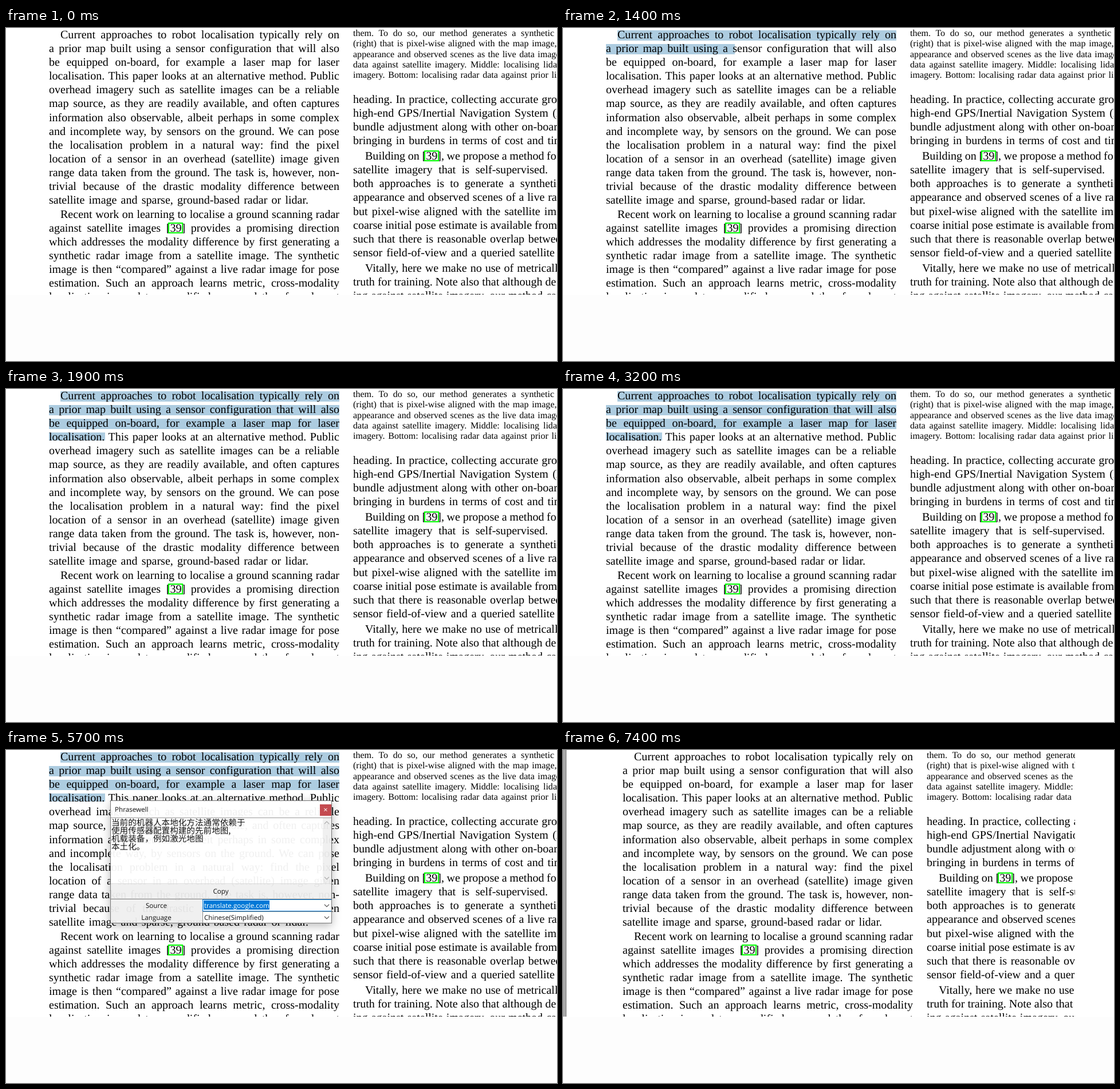
Recreate the animation shown at these times as an HTML page with a canvas. Size 962 by 582 pixels, loop 8 s.

```html
<!DOCTYPE html>
<html lang="en">
<head>
<meta charset="utf-8">
<style>
html, body { margin: 0; width: 100%; height: 100%; overflow: hidden; background: #fff; }
canvas { display: block; }
</style>
</head>
<body>
<canvas id="stage" width="962" height="582"></canvas>
<script>
const ctx = document.getElementById('stage').getContext('2d');
const SERIF = '"Liberation Serif", serif';
const UI = '11.65px "Open Sans", sans-serif';
const CJK = '14.6px "Noto Sans CJK SC", "Noto Sans CJK", sans-serif';
const LOOP = 8000, PITCH = 24.15, PAGE_BOTTOM = 466;

const left = `Current approaches to robot localisation typically rely on
a prior map built using a sensor configuration that will also
be equipped on-board, for example a laser map for laser
localisation. This paper looks at an alternative method. Public
overhead imagery such as satellite images can be a reliable
map source, as they are readily available, and often captures
information also observable, albeit perhaps in some complex
and incomplete way, by sensors on the ground. We can pose
the localisation problem in a natural way: find the pixel
location of a sensor in an overhead (satellite) image given
range data taken from the ground. The task is, however, non-
trivial because of the drastic modality difference between
satellite image and sparse, ground-based radar or lidar.
Recent work on learning to localise a ground scanning radar
against satellite images [39] provides a promising direction
which addresses the modality difference by first generating a
synthetic radar image from a satellite image. The synthetic
image is then “compared” against a live radar image for pose
estimation. Such an approach learns metric, cross-modality
localisation is used to a modified map and therefore do not`.split('\n');

// Blocks of the right column: font size, first baseline, pitch, indent, [text, right end]
const right = [
  [16.04, 14.2, 18.15, 0, [
    ['them. To do so, our method generates a synthetic', 957],
    ['(right) that is pixel-wise aligned with the map image,', 961.5],
    ['appearance and observed scenes as the live data image', 967.5],
    ['data against satellite imagery. Middle: localising lida', 962],
    ['imagery. Bottom: localising radar data against prior li', 961.5]]],
  [20.05, 130.6, PITCH, 0, [
    ['heading. In practice, collecting accurate gro', 962],
    ['high-end GPS/Inertial Navigation System (I', 967.5],
    ['bundle adjustment along with other on-boar', 962.8],
    ['bringing in burdens in terms of cost and tim', 972.3]]],
  [20.05, 229.9, PITCH, 21, [
    ['Building on [39], we propose a method fo', 960.8],
    ['satellite imagery that is self-supervised.', 946],
    ['both approaches is to generate a synthetic', 970],
    ['appearance and observed scenes of a live ra', 961.7],
    ['but pixel-wise aligned with the satellite im', 961],
    ['coarse initial pose estimate is available from', 962],
    ['such that there is reasonable overlap betwee', 968.5],
    ['sensor field-of-view and a queried satellite', 958]]],
  [20.05, 425.9, PITCH, 21, [
    ['Vitally, here we make no use of metricall', 963.5],
    ['truth for training. Note also that although de', 960.5],
    ['ing against satellite imagery, our method ca', 961]]]
];

// Selection: start time, last selected line, its right end
const selection = [[1300, 0, 141], [1400, 1, 300], [1700, 2, 160], [1800, 3, 130], [1900, 3, 173]];
const caretToggles = [4900, 5100, 5700, 6000, 6500, 6800];

function box(x, y, w, h, fill) {
  ctx.fillStyle = fill;
  ctx.fillRect(x, y, w, h);
}

function frame(x, y, w, h, color) {
  ctx.strokeStyle = color;
  ctx.lineWidth = 1;
  ctx.strokeRect(x + .5, y + .5, w - 1, h - 1);
}

function label(str, x, y, color = '#111', align = 'left', font = UI) {
  ctx.font = font;
  ctx.textAlign = align;
  ctx.fillStyle = color;
  ctx.fillText(str, x, y);
}

function chevron(x, y, dir, color) {
  ctx.strokeStyle = color;
  ctx.lineWidth = 1.1;
  ctx.beginPath();
  ctx.moveTo(x - 4, y - 2 * dir);
  ctx.lineTo(x, y + 2 * dir);
  ctx.lineTo(x + 4, y - 2 * dir);
  ctx.stroke();
}

function justified(str, x, y, end, size) {
  ctx.font = `${size}px ${SERIF}`;
  ctx.textAlign = 'left';
  ctx.fillStyle = '#000';
  ctx.wordSpacing = '0px';
  const gaps = str.split(' ').length - 1;
  ctx.wordSpacing = (end - x - ctx.measureText(str).width) / gaps + 'px';
  ctx.fillText(str, x, y);
  const cite = str.indexOf('39');
  if (cite > 0) {
    const cx = x + ctx.measureText(str.slice(0, cite)).width;
    ctx.strokeStyle = '#0f0';
    ctx.lineWidth = 2;
    ctx.strokeRect(Math.round(cx - 2), Math.round(y - 15), 24, 17);
  }
  ctx.wordSpacing = '0px';
}

const indented = i => i === 0 || i === 13;
const leftEdge = i => indented(i) ? 95 : 75;

function drawSelection(t) {
  const step = selection.filter(s => t >= s[0]).pop();
  if (!step) return;
  const [, last, end] = step;
  for (let i = 0; i <= last; i++) {
    const x = leftEdge(i);
    box(x, 4 + 24 * i, (i < last ? 582 : end) - x, i === 3 ? 14 : 18, '#adcce0');
  }
}

function drawPage(t) {
  const scrolled = t >= 7400;
  ctx.save();
  ctx.beginPath();
  ctx.rect(0, 0, scrolled ? 894 : 962, PAGE_BOTTOM);
  ctx.clip();
  if (scrolled) {
    box(0, 0, 5, PAGE_BOTTOM, '#a9a9a9');
    box(5, 0, 1, PAGE_BOTTOM, '#777');
    ctx.translate(29, 0);
  } else drawSelection(t);
  left.forEach((str, i) =>
    justified(str, leftEdge(i), 17.6 + PITCH * i, i === 12 ? 528 : 582, 20.05));
  for (const [size, top, pitch, indent, rows] of right)
    rows.forEach(([str, end], i) =>
      justified(str, 606 + (i ? 0 : indent), top + pitch * i, end, size));
  ctx.restore();
}

function drawShadow(x, y, w, h) {
  ctx.save();
  ctx.beginPath();
  ctx.rect(0, 0, 962, 582);
  ctx.rect(x, y, w, h);
  ctx.clip('evenodd');
  ctx.shadowColor = 'rgba(0,0,0,.28)';
  ctx.shadowBlur = 15;
  ctx.shadowOffsetY = 4;
  box(x, y, w, h, '#fff');
  ctx.restore();
}

function drawPopup(t) {
  const white = 'rgba(255,255,255,.94)', grey = 'rgba(240,240,240,.95)';
  drawShadow(182, 88, 387, 215);
  box(182, 88, 387, 30, white);
  box(182, 118, 371, 115, white);
  box(553, 118, 16, 115, grey);
  box(182, 233, 387, 70, grey);

  label('Phrasewell', 190, 107.5);
  box(548, 95, 20, 20, '#c44b50');
  label('×', 558, 109, '#fff', 'center', '13px "Open Sans", sans-serif');

  box(182, 118, 387, 1, '#999');
  ['当前的机器人本地化方法通常依赖于', '使用传感器配置构建的先前地图,', '机载装备，例如激光地图', '本土化。']
    .forEach((str, i) => label(str, 184, 132.3 + 13.8 * i, '#111', 'left', CJK));
  chevron(560, 127, -1, '#aaa');
  chevron(560, 224, 1, '#aaa');

  box(182, 233, 387, 1, '#ddd');
  label('Copy', 375, 251, '#111', 'center');
  box(182, 260, 387, 1, '#777');
  label('Source', 262.5, 276, '#111', 'center');
  label('Language', 262.5, 297, '#111', 'center');

  box(343, 261, 226, 41, '#fff');
  frame(343, 261, 226, 21, '#0078d7');
  frame(343, 282, 226, 21, '#888');
  box(345, 263, 115, 16, '#0078d7');
  label('translate.google.com', 346, 276, '#fff');
  label('Chinese(Simplified)', 346, 297);
  chevron(560, 272, 1, '#555');
  chevron(560, 293, 1, '#555');
  if (caretToggles.filter(c => t >= c).length % 2 === 0) box(460, 263, 1, 16, '#000');
  frame(182, 88, 387, 215, '#777');
}

function render(now) {
  const t = now % LOOP;
  box(0, 0, 962, 582, '#fff');
  box(0, 467, 962, 115, '#fdfdfd');
  drawPage(t);
  if (t >= 4300 && t < 7400) drawPopup(t);
}

ctx.textRendering = 'geometricPrecision';
const start = performance.now();
function tick() {
  render(performance.now() - start);
  requestAnimationFrame(tick);
}
tick();
</script>
</body>
</html>
```
